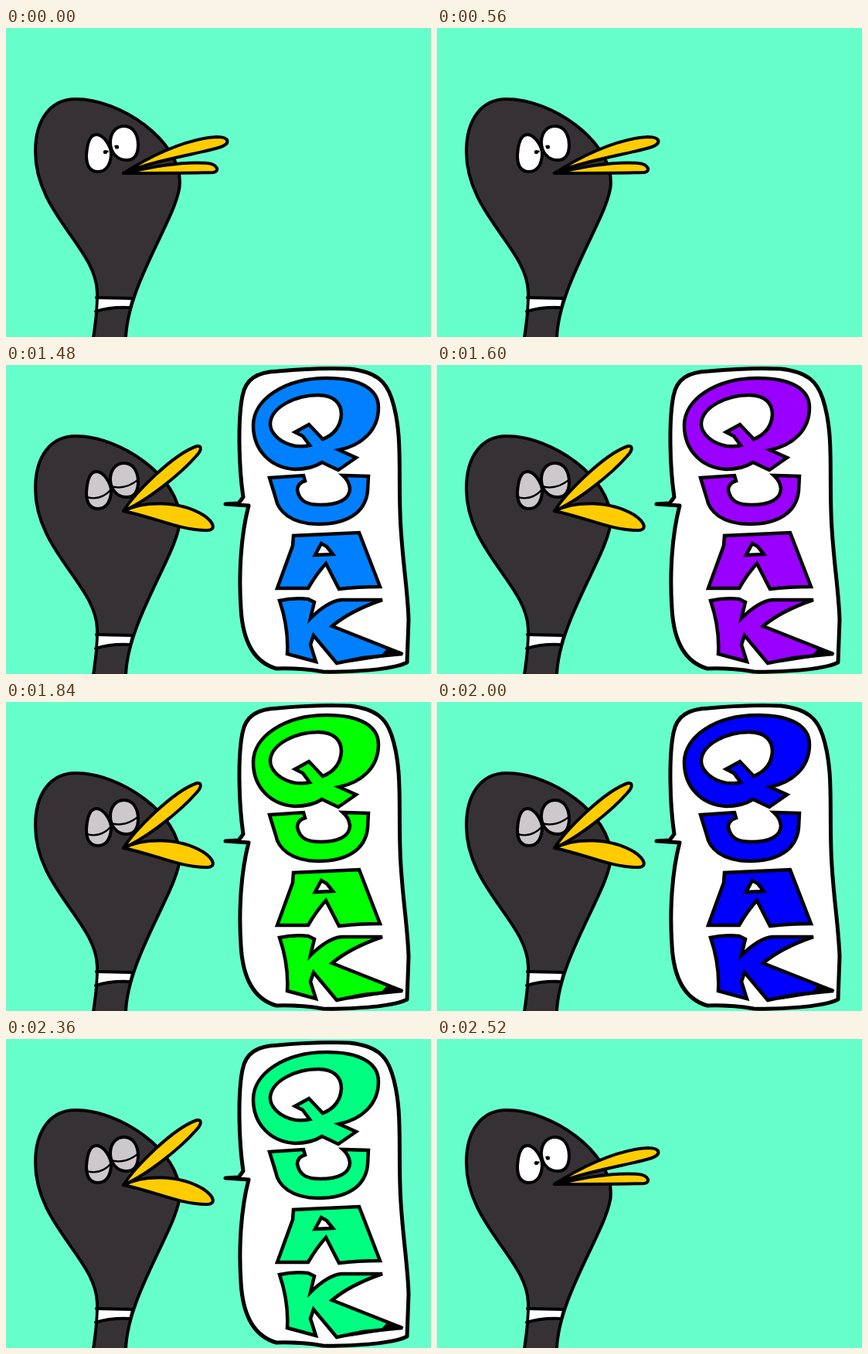
An HTML page that plays this animation: 550 px wide and 400 px high, repeating every 2760 ms.

```html
<!DOCTYPE html>
<html lang="en">
<head>
<meta charset="utf-8">
<title>Quacking bird</title>
<style>
  html, body { margin: 0; width: 100%; height: 100%; overflow: hidden; background: #6fc; }
  svg { display: block; width: 100%; height: 100%; }
  .ink { stroke: #000; stroke-width: 4; stroke-linejoin: round; stroke-linecap: round; }
  .crease { fill: none; stroke: #000; stroke-width: 2.4; }
  .lid { fill: #cdc8cc; }
  .white { fill: #fff; }
</style>
</head>
<body>
<svg viewBox="0 0 550 400">
  <defs>
    <path id="eyeL" d="M117 138C126 138 137 153 136 165C135 179 128 186 119 186C108 186 104 177 104 165C105 149 109 138 117 138Z"/>
    <path id="eyeR" d="M153 127C165 127 171 139 171 151C171 164 166 171 156 171C143 171 135 160 135 148C135 136 142 127 153 127Z"/>
    <clipPath id="inL"><use href="#eyeL"/></clipPath>
    <clipPath id="inR"><use href="#eyeR"/></clipPath>
  </defs>

  <path class="ink" fill="#353135" d="M113 402C115 385 119 365 118 342C117 285 38 240 38 160C38 118 58 92 90 92C148 92 225 145 225 200C225 240 157 330 155 402"/>
  <path class="white" d="M120 350H162L159 362Q135 361 119 367Z"/>
  <path class="ink" fill="none" d="M117 349L163 350M116 367Q135 361 159 362"/>

  <g class="white"><use href="#eyeL"/><use href="#eyeR"/></g>

  <g id="half">
    <g clip-path="url(#inL)">
      <path class="lid" d="M100 130H140V149L100 166ZM100 184L140 164V190H100Z"/>
      <path class="crease" d="M100 166L140 149M100 184L140 164"/>
    </g>
    <g clip-path="url(#inR)">
      <path class="lid" d="M130 120H175V136L130 155ZM130 169L175 151V175H130Z"/>
      <path class="crease" d="M130 155L175 136M130 169L175 151"/>
    </g>
  </g>

  <g id="pupils">
    <circle cx="128.500" cy="160.500" r="2.600"/>
    <circle cx="143.500" cy="154" r="2.600"/>
    <path class="crease" d="M129 160.500L132.500 159.500M140.500 152.500L144 154"/>
  </g>

  <g id="closed">
    <g class="lid"><use href="#eyeL"/><use href="#eyeR"/></g>
    <path class="crease" clip-path="url(#inL)" d="M102 170Q122 178 138 159"/>
    <path class="crease" clip-path="url(#inR)" d="M133 156Q154 164 174 146"/>
  </g>

  <g class="ink" fill="none"><use href="#eyeL"/><use href="#eyeR"/></g>
  <g class="ink" fill="#fc0"><path id="lower"/><path id="upper"/></g>

  <g id="bubble" stroke="#000">
    <path class="white" stroke-width="5" stroke-linejoin="round" d="M284 180L301 179L307 171C301 130 300 70 306 40C310 18 325 9 352 8Q405 3 445 5C480 9 492 22 499 43C513 85 508 130 510 190C511 240 520 290 521 330L519 385C500 395 440 398 410 397Q380 392 350 393C318 384 306 352 304 315C301 270 304 220 314 182Z"/>
    <g id="letters" stroke-width="4.500" fill-rule="evenodd">
      <path d="M320 78C320 45 360 17 415 17C458 17 482 31 482 55C482 85 460 104 431 110L453 120L430 136L409 126C398 133 388 135 374 135C342 133 320 110 320 78ZM342 75C344 54 375 39 404 39C425 39 434 50 434 64C433 80 425 90 410 96L392 77L374 87L384 92L393 104C365 110 341 92 342 75Z"/>
      <path d="M341 146L385 143L387 150Q377 153 377 162C380 177 390 181 407 181C430 181 445 174 445 160Q444 150 436 143L469 144L468 163C465 192 440 206 404 206C370 206 352 190 349 172Z"/>
      <path d="M351 289L371 234L372 221L457 217L484 287Q455 287 431 290L414 257Q402 270 391 289ZM400 246L408 231L415 235L423 245Z"/>
      <path d="M354 305Q372 301 391 303L399 307L394 328Q416 306 434 304L487 304Q446 318 422 338L513 374L462 379L428 386L398 350L394 362L401 384L364 374Q366 340 354 305Z"/>
    </g>
    <path stroke="none" d="M440 386L515 374L495 365L486 375Z"/>
  </g>
</svg>
<script>
const LOOP = 2760, STEP = 40;
const $ = id => document.getElementById(id);
const show = (id, on) => $(id).style.display = on ? '' : 'none';
const within = (t, from, to) => t >= from && t < to;

// Each half of the beak: at rest, wide open.
const beak = {
  upper: ['M152 188C180 170 230 143 273 141C290 141 290 150 278 154C250 163 195 170 152 188Z',
          'M152 189C166 167 215 116 247 105C255 104 252 112 246 118C225 142 182 176 152 189Z'],
  lower: ['M152 188C180 182 225 172 260 175C274 176 277 186 268 187C235 188 190 188 152 188Z',
          'M152 189C180 175 225 176 255 194C270 204 272 214 260 214C225 214 195 198 152 189Z']
};
const hues = [276, 318, 0, 30, 60, 90, 120, 150, 180, 210, 240, 258];

function blend([from, to], amount) {
  const ends = to.match(/\d+/g);
  let i = 0;
  return from.replace(/\d+/g, n => +n + (ends[i++] - n) * amount);
}

function draw(now) {
  const t = Math.floor(now % LOOP / STEP) * STEP;
  const closed = within(t, 440, 520) || within(t, 1400, 2400);
  const half = [400, 520, 1360, 2400].includes(t);
  const quacking = within(t, 1480, 2480);
  const opening = quacking ? 1 : t === 1440 || t === 2480 ? 0.5 : 0;

  show('closed', closed);
  show('half', half);
  show('pupils', !closed);
  show('bubble', quacking);
  for (const part in beak) $(part).setAttribute('d', blend(beak[part], opening));
  const hue = hues[(t / STEP + 8) % hues.length];
  $('letters').setAttribute('fill', `hsl(${hue}, 100%, 50%)`);
}

const start = performance.now();
function tick() {
  draw(performance.now() - start);
  requestAnimationFrame(tick);
}
tick();
</script>
</body>
</html>
```
